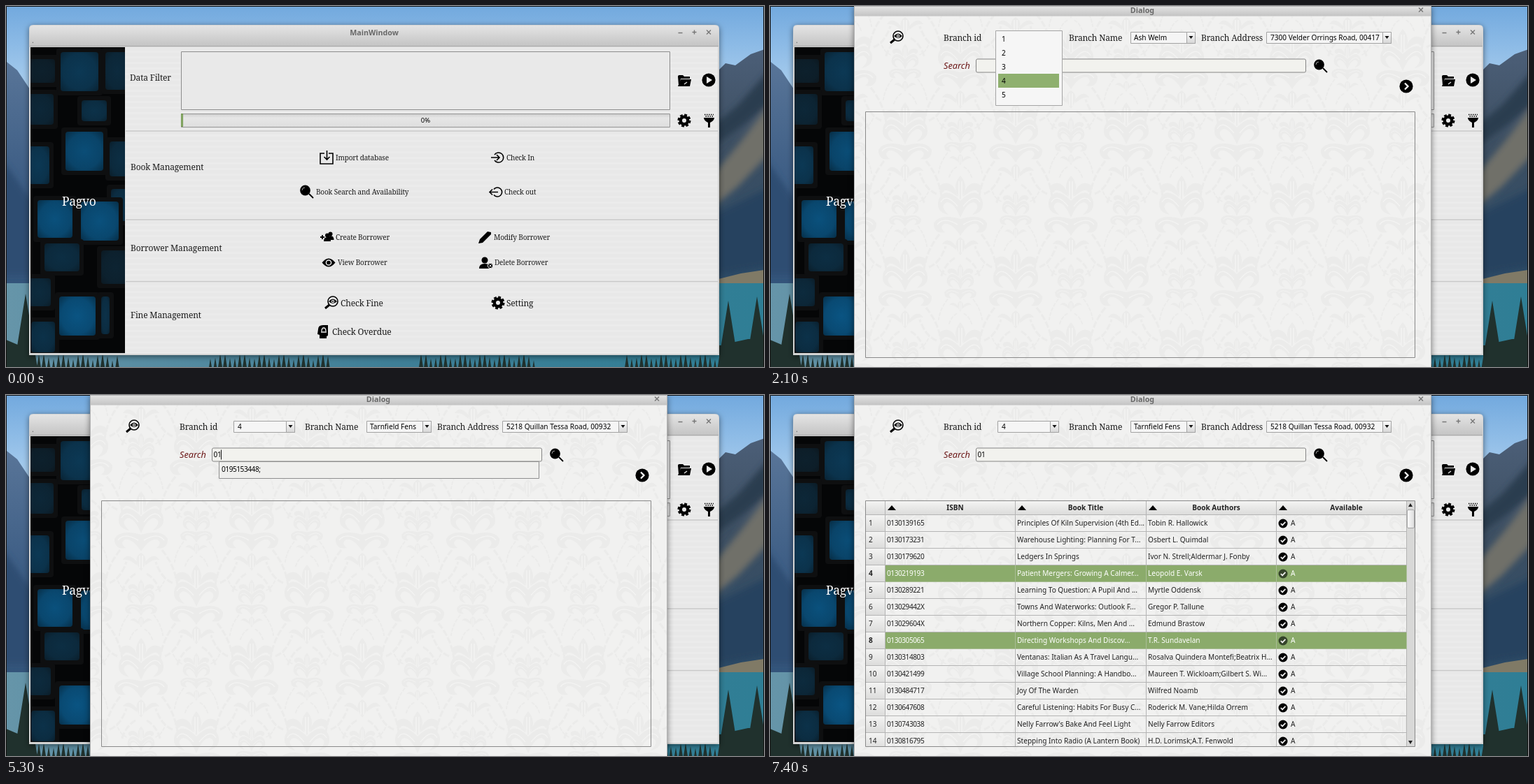
An HTML page that plays this animation: 1083 by 517 pixels, repeating every 8000 ms.

```html
<!DOCTYPE html>
<html lang="en">
<head>
<meta charset="utf-8">
<title>Library manager</title>
<style>
html, body { margin: 0; width: 100%; height: 100%; overflow: hidden; }
#stage, #dialog, #stage > svg, #dialog > svg { position: absolute; left: 0; top: 0; width: 1083px; height: 517px; }
#stage { overflow: hidden; background: #78abd6; font: 10.1px "Noto Sans", "Open Sans", sans-serif; color: #222; }
svg { display: block; }
.serif { font: 12px "Noto Serif", serif; letter-spacing: -.014em; fill: #1c1c1c; }
.small { font-size: 10px; }
.title { font-weight: 700; font-size: 10.7px; fill: #686868; text-anchor: middle; }
.num { letter-spacing: -.45px; }
.ink { fill: none; stroke: #000; }

#table { position: absolute; left: 137px; top: 152px; width: 784px; height: 351px; overflow: hidden; }
.row { position: absolute; left: 0; width: 773px; height: 24px; display: grid;
  grid-template-columns: 28px 186px 187px 186px 186px; line-height: 23px; white-space: pre; }
.row > * { box-sizing: border-box; overflow: hidden; padding-left: 2px; position: relative;
  border-right: 1px solid #b5b5b5; border-bottom: 1px solid #b5b5b5; }
.row > :first-child, .head > * { background: linear-gradient(#f4f4f3, #dcdcdb); }
.row > :first-child { padding-left: 4px; }
.head { height: 20px; line-height: 19px; text-align: center; }
.head > :not(:first-child) { padding-left: 14px; }
.head > :not(:first-child)::before { content: ""; position: absolute; left: 3px; top: 6px;
  border: solid transparent; border-width: 0 6.5px 7px; border-bottom-color: #000; }
.head.bold, .picked > :first-child { font-weight: 700; }
.picked > :not(:first-child) { background: #8bab6b; color: #fff; border-color: #a9bd95; }
.picked circle { fill: #34432a; }
.row > .mark { padding-left: 20px; }
.mark svg { position: absolute; left: 2px; top: 5px; width: 14px; height: 14px; }
#bar { position: absolute; left: 773px; top: 0; width: 11px; height: 351px; background: #d8d8d7; }
#bar i { position: absolute; left: 0; width: 9px; height: 25px; top: 12px; border: 1px solid #a5a5a5;
  border-radius: 2px; background: linear-gradient(90deg, #fafafa, #ddd); }
#bar b { position: absolute; left: 2px; top: 3px; border: solid transparent; border-width: 0 3.5px 5px; border-bottom-color: #222; }
#bar b + b { top: 343px; transform: scaleY(-1); }

#dialog, #caret, #before, #after, #menu, #hover, #focus, #zero, #one, #hint, #rest, #table, #plain, #bold, #pick4, #pick8 {
  animation: 8s step-end infinite; }
#dialog { animation-name: open; }
#caret { animation-name: blink, advance; }
#before { animation-name: before; }
#after { animation-name: after; }
#menu { animation-name: menu; }
#hover { animation-name: hover; }
#focus { animation-name: focus; }
#zero { animation-name: zero; }
#one { animation-name: one; }
#hint { animation-name: hint; }
#rest { animation-name: rest; }
#table { animation-name: table; }
#plain { animation-name: plain; }
#bold, #pick4 { animation-name: pick4; }
#pick8 { animation-name: pick8; }
@keyframes open { 0% { opacity: 0 } 6.25%, 100% { opacity: 1 } }
@keyframes blink {
  0%, 12.5%, 22.5%, 43.75%, 58.75%, 71.25%, 83.75%, 100% { opacity: 0 }
  6.25%, 17.5%, 37.5%, 50%, 66.25%, 77.5% { opacity: 1 } }
@keyframes advance { 0% { transform: none } 50% { transform: translateX(5.5px) } 52.5%, 100% { transform: translateX(11px) } }
@keyframes before { 0% { opacity: 1 } 33.75%, 100% { opacity: 0 } }
@keyframes after { 0% { opacity: 0 } 33.75%, 100% { opacity: 1 } }
@keyframes menu { 0%, 33.75%, 100% { opacity: 0 } 23.75% { opacity: 1 } }
@keyframes hover { 0% { transform: none } 26.25%, 100% { transform: translateY(60px) } }
@keyframes focus { 0%, 37.5%, 100% { opacity: 0 } 33.75% { opacity: 1 } }
@keyframes zero { 0% { opacity: 0 } 50%, 100% { opacity: 1 } }
@keyframes one { 0% { opacity: 0 } 52.5%, 100% { opacity: 1 } }
@keyframes hint { 0%, 71.25%, 100% { opacity: 0 } 50% { opacity: 1 } }
@keyframes rest { 0% { opacity: 1 } 52.5%, 100% { opacity: 0 } }
@keyframes table { 0% { opacity: 0 } 71.25%, 100% { opacity: 1 } }
@keyframes plain { 0% { opacity: 1 } 83.75%, 100% { opacity: 0 } }
@keyframes pick4 { 0% { opacity: 0 } 83.75%, 100% { opacity: 1 } }
@keyframes pick8 { 0% { opacity: 0 } 92.5%, 100% { opacity: 1 } }
</style>
</head>
<body>
<div id="stage">
<svg viewBox="0 0 1083 517">
  <defs>
    <linearGradient id="sky" x2="0" y2="1"><stop stop-color="#72a9de"/><stop offset=".22" stop-color="#a8cdee"/></linearGradient>
    <linearGradient id="haze" x2="0" y2="1"><stop stop-color="#5a7699"/><stop offset=".5" stop-color="#3f5f86"/><stop offset="1" stop-color="#33547a"/></linearGradient>
    <linearGradient id="rock" x2="0" y2="1"><stop stop-color="#4c5f78"/><stop offset=".4" stop-color="#3d4f62"/><stop offset="1" stop-color="#2b4a66"/></linearGradient>
    <linearGradient id="lake"><stop stop-color="#6695a9"/><stop offset=".5" stop-color="#3f7f97"/><stop offset="1" stop-color="#2f7e95"/></linearGradient>
    <linearGradient id="chrome" x2="0" y2="1"><stop stop-color="#e4e4e4"/><stop offset="1" stop-color="#c3c3c3"/></linearGradient>
    <radialGradient id="tile" r=".75"><stop stop-color="#0a5482"/><stop offset=".6" stop-color="#094a73"/><stop offset="1" stop-color="#052b43"/></radialGradient>
    <linearGradient id="button" x2="0" y2="1"><stop stop-color="#fcfcfc"/><stop offset="1" stop-color="#d6d6d6"/></linearGradient>
    <linearGradient id="trough" x2="0" y2="1"><stop stop-color="#cfcfcf"/><stop offset=".3" stop-color="#e6e6e6"/><stop offset="1" stop-color="#dedede"/></linearGradient>
    <pattern id="lines" width="8" height="8" patternUnits="userSpaceOnUse"><path fill="#e8e8e8" d="M0 0h8v8H0z"/><path fill="#ebebeb" d="M0 0h8v3H0z"/></pattern>
    <clipPath id="side"><path d="M35 59h135v438H35z"/></clipPath>
    <filter id="soft"><feGaussianBlur stdDeviation="4"/></filter>
    <filter id="shade" x="-5%" y="-5%" width="110%" height="115%"><feDropShadow dx="0" dy="2" stdDeviation="4" flood-opacity=".5"/></filter>
    <g id="gear"><circle class="ink" r="5.2" stroke-width="4.4"/><circle class="ink" r="7.9" stroke-width="3.2" stroke-dasharray="3.7 2.504"/></g>
    <g id="lens"><circle cx="-2.500" cy="-2" r="7.400"/><path class="ink" d="M3 3l6 6" stroke-width="1.800"/><path d="M-7-2a4 4 0 0 1 4-4" fill="none" stroke="#999"/></g>
    <g id="eyelens"><circle class="ink" cx="2" cy="-2" r="7" stroke-width="1.600"/><path class="ink" d="M-3 3l-6 5" stroke-width="3"/><path d="M-4-2q6-7 12 0q-6 6-12 0"/><circle cx="2" cy="-2" r="2.200" fill="#eee"/><circle cx="2" cy="-2" r="1.100"/></g>
    <g id="person"><circle cy="-3.500" r="3"/><path d="M-5 5q0-6 5-6t5 6z"/></g>
  </defs>

  <rect width="1083" height="517" fill="url(#sky)"/>
  <path fill="url(#haze)" d="M-9 72l25 20 24 36v275H-9z"/>
  <path fill="url(#rock)" d="M1010 100l18-18 14 3 22-16 28-10v341h-82z"/>
  <g filter="url(#soft)">
    <path fill="#6f7069" d="M1090 142l-40 52-40 48v46l36-30 44-46z"/>
    <path fill="#2a3d50" d="M1090 92l-44 50-36 30v30l44-32 36-30z"/>
    <path fill="#27435f" d="M1010 300l80-40v112l-80 14z"/>
    <path fill="#2f4d72" d="M-9 215l50 70v100H-9z"/>
  </g>
  <path fill="#807a66" d="M1010 393l40-10 33-5v20h-73z"/>
  <path fill="url(#lake)" d="M0 397h1083v120H0z"/>
  <path id="trees" fill="#20312d"/>

  <g filter="url(#shade)"><path fill="#d5d5d5" d="M33 500V33q0-6 6-6h974q6 0 6 6v467z"/></g>
  <path fill="url(#chrome)" d="M34 58V33q0-5 5-5h974q5 0 5 5v25z"/>
  <path stroke="#aaa" d="M34 57.5h984"/>
  <text class="title" x="526" y="42">MainWindow</text>
  <text x="37" y="53" fill="#666">.</text>
  <path stroke="#777" stroke-width="1.400" d="M960.500 38.500h6M980.500 37.500h6m-3-3v6M1001 34.500l6 6m0-6l-6 6"/>
  <path fill="url(#lines)" d="M170 59h847v439H170z"/>
  <path fill="#050607" d="M35 59h135v438H35z"/>
  <g id="tiles" clip-path="url(#side)"></g>
  <text class="serif" x="80" y="286" style="font-size:17.400px;fill:#fff">Pagvo</text>
  <path stroke="#c9c9c9" stroke-width="1.500" d="M171 179h846M171 306h846M171 394.500h846"/>
  <path fill="#e9e9e9" stroke="#8c8c8c" d="M250.500 65.500h698v83h-698z"/>
  <path fill="url(#trough)" stroke="#959595" d="M250.500 154.500h698v19h-698z"/>
  <path fill="#9dbb80" stroke="#6b9147" d="M250.500 154.500h2v18h-2z"/>
  <text x="599.500" y="167" text-anchor="middle" font-size="9.500">0%</text>

  <g class="serif">
    <text x="177" y="107">Data Filter</text><text x="178" y="235">Book Management</text>
    <text x="178" y="351">Borrower Management</text><text x="178" y="447">Fine Management</text>
    <text x="478" y="430">Check Fine</text><text x="715" y="430">Setting</text><text x="466" y="471">Check Overdue</text>
    <g class="small">
      <text x="471" y="221">Import database</text><text x="715" y="221">Check In</text>
      <text x="443" y="270">Book Search and Availability</text><text x="712" y="270">Check out</text>
      <text x="471" y="335">Create Borrower</text><text x="697" y="335">Modify Borrower</text>
      <text x="474" y="371">View Borrower</text><text x="698" y="371">Delete Borrower</text>
    </g>
  </g>

  <path d="M960 101q0-2 2-2h5l2 2h8v3h-13l-3 9zM964 105h15l-2 10h-17z"/>
  <path stroke="#ddd" stroke-width="1.500" d="M969 112l4-3"/>
  <circle cx="1004" cy="106" r="9.600"/><path fill="#eee" d="M1001 101l8 5-8 5z"/>
  <use href="#gear" x="969" y="164"/>
  <path d="M997 160h15q0 4-6 7v7h-3v-7q-6-3-6-7z"/>
  <path stroke="#000" stroke-width="1.500" stroke-dasharray="1.500 1.500" d="M998 155.500h13M999.500 158h11"/>
  <g class="ink" stroke-width="1.600">
    <path d="M455 211h-6v15h18v-15h-6M458.500 207v13m-4-4l4 4 4-4"/>
    <path d="M698 213a7 7 0 1 1 0 8M693 217h12m-4-4l4 4-4 4"/>
    <path d="M697 262.500a6.500 6.500 0 1 1 0 8M703 266.500h-12m4-4l-4 4 4 4"/>
  </g>
  <use href="#lens" x="430" y="266"/>
  <path stroke="#000" stroke-width="1.800" d="M449 331h6m-3-3v6"/>
  <use href="#person" x="463.500" y="330"/><use href="#person" x="459" y="332"/>
  <path d="M675 340l2-6 11-11 5 1 0 3-12 12z"/>
  <path d="M451.500 367.500q9.500-12 19 0q-9.500 12-19 0"/><circle cx="461" cy="367.500" r="3.600" fill="none" stroke="#eee" stroke-width="1.500"/>
  <circle cx="684" cy="364" r="4.500"/><path d="M676 376q0-7 8-7t8 7z"/><circle cx="692" cy="372" r="3.700" stroke="#e9e9e9"/><path stroke="#eee" d="M690.500 370.500l3 3m0-3l-3 3"/>
  <use href="#eyelens" x="465" y="425"/><use href="#gear" x="703" y="425"/>
  <path d="M446 463q0-6 7-6h7v14q0 2-2 2v3h-10v-5l-3-1z"/><path fill="none" stroke="#eee" stroke-width="1.300" d="M450 467h8m-7-1q0-5 3-5t3 5"/>
  <path fill="none" stroke="#111" d="M.500 517V.500h1082V517"/>
</svg>

<div id="dialog">
<svg viewBox="0 0 1083 517">
  <defs>
    <g id="half">
      <path d="M0-56Q14-40 0-22M0-20Q22-42 31-22Q36-4 17 0Q31-13 19-18Q9-18 0 4M0 6Q30-2 38 12Q38 28 22 25Q31 18 23 13Q12 11 0 30M0 32Q13 40 0 58M4-26Q10-50 26-44Q36-38 25-32Q22-41 4-26M6 45Q18 30 26 42Q17 40 6 50"/>
      <path fill="none" stroke="#f3f3f2" stroke-width="1.500" d="M4-12Q20-32 28-18M4 14Q24 2 33 14M2-48v24M2 36v18"/>
      <path fill="none" stroke="#ebebea" stroke-width="3" stroke-dasharray="9 3" d="M30 28Q48 50 52 78M34-30Q50-36 58-60M8 62Q22 70 28 90"/>
    </g>
    <g id="motif"><use href="#half"/><use href="#half" transform="scale(-1 1)"/></g>
    <g id="spray"><use href="#motif"/><use href="#motif" transform="translate(0 104) scale(.6)"/></g>
    <pattern id="damask" x="114" y="82" width="158" height="210" patternUnits="userSpaceOnUse">
      <path fill="#f1f1f0" d="M0 0h158v210H0z"/>
      <g fill="#ebebea"><use href="#spray" x="79" y="112"/><use href="#spray" x="79" y="-98"/><use href="#spray" y="7"/><use href="#spray" x="158" y="7"/><use href="#spray" y="217"/><use href="#spray" x="158" y="217"/></g>
    </pattern>
  </defs>
  <path filter="url(#shade)" fill="#eee" d="M120 0h825v530H120z"/>
  <path fill="url(#damask)" d="M120 14h825v503H120z"/>
  <path fill="url(#chrome)" d="M120 0h825v14.500H120z"/>
  <path stroke="#b5b5b5" d="M120 .500h825M120.500 0v517M944.500 0v517"/>
  <text class="title" x="532" y="10">Dialog</text>
  <path stroke="#777" stroke-width="1.500" d="M927 2.500l6 6m0-6l-6 6"/>
  <use href="#eyelens" x="181" y="45"/>
  <g class="serif"><text x="248" y="50">Branch id</text><text x="427" y="50">Branch Name</text><text x="616" y="50">Branch Address</text></g>
  <g id="combos"></g>
  <path id="focus" fill="#8fb06f" d="M328 38.500h72v13h-72z"/>
  <g id="before"><text x="331" y="49">1</text><text x="520" y="49">Ash Welm</text><text x="715" y="49">7300 Velder Orrings Road, 00417</text></g>
  <g id="after"><text x="331" y="49">4</text><text x="520" y="49">Tarnfield Fens</text><text x="715" y="49">5218 Quillan Tessa Road, 00932</text></g>

  <text x="248" y="90" fill="#6b1717" font-size="12.700" font-style="italic">Search</text>
  <rect x="294.500" y="76" width="471" height="19" rx="2" fill="#f2f2ee" stroke="#858585"/>
  <text id="zero" x="296.500" y="89" class="num">0</text><text id="one" x="302" y="89" class="num">1</text>
  <path id="caret" stroke="#111" d="M296.500 78.500v14"/>
  <use href="#lens" x="787" y="86"/>
  <circle cx="909" cy="115" r="9.600"/><path fill="none" stroke="#fff" stroke-width="2.200" d="M907 110.500l4.500 4.500-4.500 4.500"/>
  <path fill="none" stroke="#8a8a8a" d="M136.500 151.500h785v352h-785z"/>

  <g id="hint"><path fill="#efefed" stroke="#8f8f8f" d="M304.500 95.500h457v24h-457z"/>
    <text class="num" x="308" y="110">0195153448;<tspan id="rest"> 0002005018; 0060973129;</tspan></text></g>
  <g id="menu"><path fill="#f6f6f6" stroke="#a5a5a5" d="M322.500 35.500h95v107h-95z"/>
    <path id="hover" fill="#8fb06f" d="M326 37h87v20h-87z"/><g id="items"></g></g>
</svg>
<div id="table"><div id="bar"><b></b><b></b><i></i></div></div>
</div>
</div>

<script>
const $ = id => document.getElementById(id);

// Scenery and side panel
const tree = (x, base, h) => `M${x} ${base - h}l${h * .16} ${h}h${-h * .32}z`;
let woods = tree(28, 520, 108) + tree(1032, 520, 98) + tree(1073, 520, 104) + 'M0 478l33 14v25H0zM1019 486l64-14v45h-64z';
for (let x = 40; x < 1020; x += 7) {
  if (Math.sin(x * .021) > -.25) woods += tree(x, 524, 16 + 10 * Math.abs(Math.sin(x * 3.7)));
}
$('trees').setAttribute('d', woods);

// x, y, width, height, brightness
const tiles = [[78, 66, 54, 56, .6], [32, 76, 38, 34, .25], [142, 66, 34, 54, .4], [30, 126, 38, 44, .35], [108, 135, 36, 30, .5],
  [85, 180, 54, 56, .9], [30, 201, 32, 54, .6], [148, 194, 30, 50, .45], [150, 262, 30, 46, .5], [45, 278, 50, 54, .95],
  [107, 280, 54, 56, .95], [55, 340, 50, 40, .45], [136, 350, 40, 48, .3], [30, 390, 34, 40, .4], [76, 416, 52, 56, 1], [136, 416, 12, 54, .5], [36, 452, 34, 44, .5]];
$('tiles').innerHTML = tiles.map(([x, y, w, h, glow]) => `<rect x="${x - 6}" y="${y - 6}" width="${w + 12}" height="${h + 12}" rx="4" fill="#0e0f10"/>
  <rect x="${x}" y="${y}" width="${w}" height="${h}" rx="4" fill="url(#tile)" opacity="${glow}"/>`).join('');

// Combo boxes and the list of branches
$('combos').innerHTML = [[325, 413], [515, 608], [709, 888]].map(([l, r]) => `
  <path fill="#f5f5f5" stroke="#a3a3a3" d="M${l + .5} 37.500H${r - .5}v16H${l + .5}z"/>
  <path fill="url(#button)" stroke="#a3a3a3" d="M${r - 12.5} 37.500h12v16h-12z"/>
  <path fill="#111" d="M${r - 9.5} 43h6l-3 4z"/>`).join('');
$('items').innerHTML = [1, 2, 3, 4, 5].map(n => `<text x="331" y="${31 + n * 20}">${n}</text>`).join('');

// Search results
const books = `0130139165|Principles Of Kiln Supervision (4th Ed...|Tobin R. Hallowick
0130173231|Warehouse Lighting: Planning For T...|Osbert L. Quimdal
0130179620|Ledgers In Springs|Ivor N. Strell;Aldermar J. Fonby
0130219193|Patient Mergers: Growing A Calmer...|Leopold E. Varsk
0130289221|Learning To Question: A Pupil And ...|Myrtle Oddensk
013029442X|Towns And Waterworks: Outlook F...|Gregor P. Tallune
013029604X|Northern Copper: Kilns, Men And ...|Edmund Brastow
0130305065|Directing Workshops And Discov...|T.R. Sundavelan
0130314803|Ventanas: Italian As A Travel Langu...|Rosalva Quindera Montefi;Beatrix H...
0130421499|Village School Planning: A Handbo...|Maureen T. Wickloam;Gilbert S. Wi...
0130484717|Joy Of The Warden|Wilfred Noamb
0130647608|Careful Listening: Habits For Busy C...|Roderick M. Vane;Hilda Orrem
0130743038|Nelly Farrow's Bake And Feel Light|Nelly Farrow Editors
0130816795|Stepping Into Radio (A Lantern Book)|H.D. Lorimsk;A.T. Fenwold`.split('\n').map(line => line.split('|'));

const tick = '<svg viewBox="0 0 14 14"><circle cx="7" cy="7" r="6.500"/><path fill="none" stroke="#eee" stroke-width="1.800" d="M3.800 7l2.300 2.400 4.300-4.600"/></svg>';
const row = (i, attrs = 'class="row"') => {
  const [isbn, title, authors] = books[i];
  return `<div ${attrs} style="top:${20 + i * 24}px"><span>${i + 1}</span><span class="num">${isbn}</span><span>${title}</span><span>${authors}</span><span class="mark">${tick}A</span></div>`;
};
const head = (id, cls) => `<div id="${id}" class="row head ${cls}" style="top:0">` +
  ['', 'ISBN', 'Book Title', 'Book Authors', 'Available'].map(s => `<span>${s}</span>`).join('') + '</div>';
const picked = n => row(n - 1, `id="pick${n}" class="row picked"`);
$('table').insertAdjacentHTML('beforeend',
  head('plain', '') + head('bold', 'bold') + books.map((_, i) => row(i)).join('') + picked(4) + picked(8));
</script>
</body>
</html>
```
